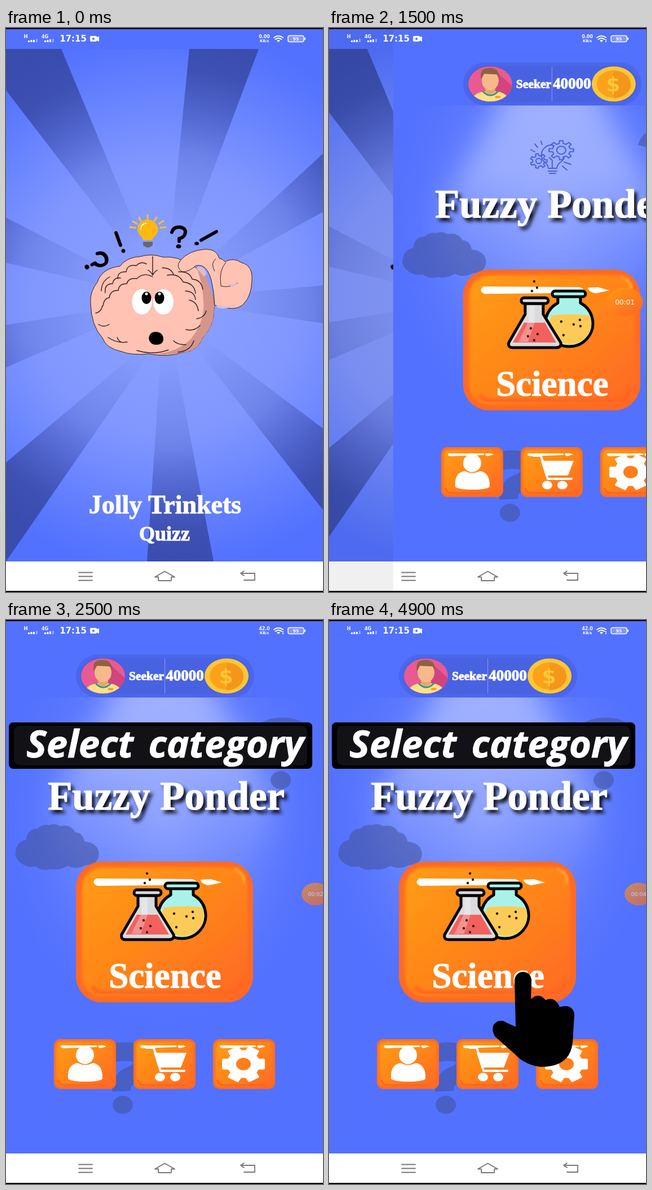
Animation, 562 px wide and 997 px high, one loop 5 s. Source, as an HTML page:

```html
<!DOCTYPE html>
<html lang="en">
<head>
<meta charset="utf-8">
<style>
html, body { margin: 0; width: 100%; height: 100%; overflow: hidden; background: #000; }
svg { display: block; width: 562px; height: 997px; }
text { fill: #fff; text-anchor: middle; }
.serif { font-family: "Liberation Serif", serif; font-weight: 700; stroke: #fff; stroke-width: 1; stroke-linejoin: round; }
.wide { font-family: "DejaVu Sans", sans-serif; }
.bold { font-weight: 700; }
.line { fill: none; stroke-linecap: round; stroke-linejoin: round; }
.shade { fill: #404e8e; stroke: #404e8e; opacity: .5; }
</style>
</head>
<body>
<svg viewBox="0 0 562 997">
<defs>
  <radialGradient id="glow" gradientUnits="userSpaceOnUse" cx="281" cy="480" r="480">
    <stop offset="0" stop-color="#8da2ff"/><stop offset=".5" stop-color="#8197ff"/>
    <stop offset=".95" stop-color="#5574ff"/><stop offset="1" stop-color="#5271ff"/>
  </radialGradient>
  <radialGradient id="rayFill" gradientUnits="userSpaceOnUse" cx="281" cy="480" r="480">
    <stop offset=".2" stop-color="#33439a" stop-opacity="0"/><stop offset=".55" stop-color="#33439a" stop-opacity=".22"/>
    <stop offset=".85" stop-color="#33439a" stop-opacity=".75"/><stop offset="1" stop-color="#33439a" stop-opacity=".8"/>
  </radialGradient>
  <radialGradient id="halo">
    <stop offset="0" stop-color="#a5b5ff" stop-opacity=".65"/><stop offset=".5" stop-color="#91a5ff" stop-opacity=".4"/>
    <stop offset="1" stop-color="#5271ff" stop-opacity="0"/>
  </radialGradient>
  <linearGradient id="beam" x2="0" y2="1">
    <stop offset="0" stop-color="#b4c1ff" stop-opacity=".75"/><stop offset=".45" stop-color="#b4c1ff" stop-opacity=".6"/>
    <stop offset="1" stop-color="#91a5ff" stop-opacity="0"/>
  </linearGradient>
  <linearGradient id="orange" x2="1" y2="1">
    <stop offset="0" stop-color="#ff9d12"/><stop offset=".5" stop-color="#ff8519"/><stop offset="1" stop-color="#ff6826"/>
  </linearGradient>
  <linearGradient id="ball" x2="1" y2="1">
    <stop offset="0" stop-color="#ff9a14"/><stop offset="1" stop-color="#ff6523"/>
  </linearGradient>
  <filter id="soft" x="-30%" y="-20%" width="160%" height="140%"><feGaussianBlur stdDeviation="26 14"/></filter>
  <filter id="blend"><feGaussianBlur stdDeviation="2.5"/></filter>
  <filter id="drop" x="-5%" y="-20%" width="110%" height="150%">
    <feDropShadow dx="5" dy="6" stdDeviation="3" flood-color="#000" flood-opacity=".9"/>
  </filter>
  <clipPath id="face"><ellipse cx="172" cy="99" rx="39" ry="31"/></clipPath>
  <clipPath id="below"><path d="M0 137H562V943H0z"/></clipPath>
  <g id="ask">
    <path d="M-12-8q3-10 14-9 13 2 9 13-3 6-10 7v5" stroke="#000" stroke-width="6" class="line"/>
    <ellipse cy="17" rx="4.5" ry="3.5"/>
  </g>
  <g id="bigAsk" class="shade">
    <path d="M450 211Q456 189 491 189 525 189 522 210 520 226 498 233 484 239 485 259" fill="none" stroke-width="33"/>
    <ellipse cx="487" cy="283" rx="18" ry="16" stroke="none"/>
  </g>
  <g id="tile">
    <rect width="110" height="88" rx="11" fill="#ff6a24"/>
    <rect x="4" y="4" width="102" height="79" rx="9" fill="url(#orange)" filter="url(#blend)"/>
    <path d="M8 73q2 8 10 8h74" stroke="#ff6420" stroke-width="3" class="line"/>
    <path d="M13 11h62q4 3-2 3l-56 2q-7-1-4-5zM79 11h9l5 2-11 3q-5-2-3-5z" fill="#fff"/>
  </g>
</defs>

<g id="splash">
  <path d="M0 0H640V943H0z" fill="url(#glow)"/>
  <g id="rays" fill="url(#rayFill)"></g>
  <path d="M0 0H640V37H0z" fill="#5271ff"/>
  <path d="M0 943H640V997H0z" fill="#fff"/>
  <g stroke="#33201e" fill="#ffc2b3">
    <path d="M150 487q-2-20 12-38 8-24 40-28 12-16 36-17 20-6 40 1 30-2 46 14 25 5 32 32 14 22 13 44 0 32-20 52-10 25-34 26-28 10-62 3-30 3-48-4-28-6-34-24-20-22-21-61z"/>
    <path d="M336 419q19 9 22 32 12 22 11 44 0 32-20 52-10 25-34 26-28 7-54 3 45-2 68-28 24-30 21-66-2-35-14-63z" fill="#d5958b" stroke="none"/>
    <path d="M370 490q-1-24-6-44-8-30-27-26-14 12-25 11-12-9-3-20 15-18 45-20 20 0 24 16 8 2 10 6 16-8 30 2 20 5 18 32-1 26-14 40-14 16-52 3z"/>
    <path d="M381 456q-4-28 9-42M381 456q14 4 30-5M372 408q-10 8-2 22" fill="none"/>
    <path d="M338 424q9-8 18 10l-5 6zM372 488q20 8 38 0-18 12-36 6zM392 452q15 4 19-8l-2 10q-8 7-17-2z" fill="#d9bdd0" stroke="none"/>
    <path class="line" stroke-width="1.4" d="M260 404v32m-8-8q6 4 8 9 3-6 8-9M198 443q0-13 15-12 2-14 18-11 8-8 18-3M176 468q-2-16 13-16 2-12 14-10M172 491q2-14 11-14 2-14 16-13 1-12 15-12 3-11 18-9 12-12 28-3M159 504q10-2 12-13M164 524q9 6 19 0M181 547q16 11 34 8m-18-8q3 8 10 9M232 570q28 9 56-1M305 573q22-2 28-20M319 560q-15 0-22-7M277 424q16 0 20 12M286 437q20-4 28 12 20 2 22 20M306 431q20-1 24 13 16 1 19 18M318 465q16 0 18 15M325 481q14 3 16 19M338 514q14-2 17-14M319 533q14 4 25-7M169 465q0-17 15-25"/>
  </g>
  <g fill="#fff">
    <ellipse cx="241" cy="484" rx="17.5" ry="22.5"/><ellipse cx="279" cy="484" rx="18" ry="22.5"/>
    <g fill="#000"><ellipse cx="249" cy="477" rx="8.5" ry="11"/><ellipse cx="272" cy="477" rx="8.5" ry="11"/>
    <path d="M253 549q1-12 13-12 12 1 13 12 0 11-13 11-10 0-13-11z"/></g>
    <circle cx="249" cy="470" r="2.5"/><circle cx="272" cy="470" r="2.5"/>
  </g>
  <path d="M243 375q-1-5-6-9-8-12 0-21 14-13 28 0 9 10 1 21-6 4-6 9z" fill="#ffb80f"/>
  <path d="M239 356q0-9 9-11" stroke="#fff3c4" stroke-width="2" class="line"/>
  <path d="M243 378h17v6q-8 8-17 0z" fill="#6a6670"/>
  <path d="M251 331v8M236 335l3 6M267 335l-4 6M225 342l7 4M279 341l-8 5M220 352l9 1M283 352l-9 1" stroke="#ffc02d" stroke-width="3" class="line"/>
  <use href="#ask" x="306" y="369"/>
  <use href="#ask" transform="translate(160 413) rotate(60) scale(.95 1.12)"/>
  <path d="M195 362l8 22M373 360l-27 15" stroke="#000" stroke-width="6" class="line"/>
  <circle cx="208" cy="394" r="3.5"/><ellipse cx="338" cy="381" rx="4" ry="3"/>
  <text class="serif" x="282" y="858" font-size="46">Jolly Trinkets</text>
  <text class="serif" x="281" y="906" font-size="36">Quizz</text>
</g>
<rect id="dim" width="562" height="997"/>

<g id="home">
  <path d="M0 0H562V943H0z" fill="#5271ff"/>
  <g clip-path="url(#below)">
    <ellipse cx="281" cy="340" rx="310" ry="400" fill="url(#halo)"/>
    <path d="M205 95H357Q390 190 460 290 490 380 450 440H112Q72 380 102 290 172 190 205 95z" fill="url(#beam)" filter="url(#soft)"/>
  </g>
  <path d="M0 943H562V997H0z" fill="#fff"/>

  <rect x="124" y="61" width="316" height="76" rx="38" fill="#4b66ea"/>
  <rect x="131" y="67" width="302" height="64" rx="32" fill="#4862e2"/>
  <g clip-path="url(#face)">
    <path d="M130 60h90v80h-90z" fill="#e95a92"/><path d="M180 75l40 35v30h-50z" fill="#d24480"/>
    <path d="M138 132q3-18 24-20h20q22 2 25 20z" fill="#ffe08a"/>
    <path d="M163 101h18v12q-9 8-18 0z" fill="#eba273"/>
    <ellipse cx="172" cy="93" rx="15" ry="17" fill="#f5b98a"/>
    <path d="M156 91q-4-20 12-20 20-3 21 20l-5-9-23-1z" fill="#92603d"/>
    <path d="M159 112q13 14 27 0" stroke="#299b83" stroke-width="3" fill="none"/>
    <path d="M181 120h9v4h-9z" fill="#ff9c24"/>
  </g>
  <text class="serif" x="249" y="106" font-size="21.5" stroke-width=".4">Seeker</text>
  <path d="M281.5 68v62" stroke="#8c9cf4"/>
  <text class="serif" x="317" y="107" font-size="27" stroke-width=".4">40000</text>
  <ellipse cx="391" cy="99" rx="39" ry="31" fill="#ffc636"/><ellipse cx="391" cy="99" rx="30" ry="24" fill="#fba21a"/>
  <path d="M391 76a30 24 0 0 1 0 48z" fill="#f3961b"/>
  <text class="wide bold" x="390" y="112" font-size="36" style="fill:#ffc636">$</text>

  <g class="line" stroke="#4960d8" stroke-width="2">
    <path id="cogs"/>
    <ellipse cx="298" cy="216" rx="8" ry="7"/><ellipse cx="258" cy="235" rx="5" ry="4.5"/>
    <path d="M275 248q0-6-6-10-10-10-4-22 8-12 20-8M275 248h15q1-7 7-11 7-6 6-9M275 253h15M277 257h11M282 247v-13l-5-5M244 215l7 4M251 205l5 6M262 200l2 6M303 237l12 4M300 244l8 7"/>
  </g>
  <use href="#bigAsk"/><use href="#bigAsk" x="-280" y="574"/>
  <path class="shade" stroke="none" d="M31 432q-18-9-13-27 4-14 18-16 1-19 20-20 8-8 21-6 10-4 19 2 18-5 27 11 12-1 16 16 22 2 25 18 2 22-23 23-17 9-32 1-14 9-30 6-17 4-26-5-13 3-22-3z"/>
  <text class="serif" x="284" y="335" font-size="71" stroke-width="2" filter="url(#drop)">Fuzzy Ponder</text>

  <rect x="124" y="427" width="314" height="249" rx="46" fill="#ff6a24"/>
  <rect x="135" y="437" width="293" height="229" rx="36" fill="url(#orange)" filter="url(#blend)"/>
  <path d="M155 650q5 9 20 9h220q20-2 24-20" stroke="#ff6320" stroke-width="7" class="line" filter="url(#blend)"/>
  <path d="M405 440q17 5 18 25" stroke="#ffae35" stroke-width="4" class="line" filter="url(#blend)"/>
  <path d="M160 457l170 1q13 4 4 9l-70 2-102 1q-12-6-2-13zM345 459l18-1 20 6-24 5q-14-3-14-10z" fill="#fff"/>
  <g stroke="#000" stroke-width="5" stroke-linejoin="round">
    <path d="M292 474h40v12a42 41 0 1 1-40 0z" fill="#a9f2ea"/>
    <rect x="282" y="465" width="59" height="10" rx="5" fill="#a9f2ea"/>
    <path d="M280 508q34-4 68 0 10 25-9 42-25 18-50 0-18-18-9-42z" fill="#fccb57" stroke="none"/>
    <path d="M234 487h32v19l31 50q2 9-8 9h-77q-9 0-7-9l29-50z" fill="#dadade"/>
    <path d="M232 521h37l20 35h-77z" fill="#f2615d" stroke="none"/>
    <path d="M240 490v28l-18 37h17l12-34v-31z" fill="#fff" opacity=".3" stroke="none"/>
    <rect x="227" y="477" width="48" height="10" rx="5" fill="#dadade"/>
  </g>
  <path d="M250 448h0M255 459h0M246 465h0M244 531h0M256 541h0M239 545h0M250 552h0M298 519h0M320 524h0M331 516h0M332 527h0M302 543h0" stroke="#201418" stroke-width="4.4" class="line"/>
  <text class="serif" x="282" y="650" font-size="63" stroke-width="1">Science</text>

  <use href="#tile" x="85" y="741"/><use href="#tile" x="226" y="741"/><use href="#tile" x="367" y="741"/>
  <g fill="#fff">
    <ellipse cx="140" cy="769" rx="16" ry="16"/>
    <path d="M110 811q-2-25 17-28 13 7 27 0 18 3 17 28-5 5-30 5t-31-5z"/>
    <path d="M249 756h13l12 41h42" stroke="#fff" stroke-width="4" class="line"/>
    <path d="M262 765h58l-10 26h-40z"/>
    <ellipse cx="273" cy="808" rx="9" ry="7.5"/><ellipse cx="300" cy="808" rx="9" ry="7.5"/>
    <path id="cog" stroke="#fff" stroke-width="4" stroke-linejoin="round"/>
    <ellipse cx="421" cy="785" rx="13" ry="11" fill="#ff7d1c"/>
  </g>
</g>

<g id="banner">
  <rect x="5" y="181" width="538" height="82" rx="8"/>
  <rect x="14" y="187" width="520" height="70" rx="10" fill="#121115"/>
  <text x="282" y="242.500" font-size="67" font-family="Open Sans, sans-serif" font-weight="700" font-style="italic" word-spacing="9" stroke="#fff">Select category</text>
</g>
<g id="bubble"><ellipse rx="32" ry="25.5" fill="url(#ball)"/><text id="count" class="wide" y="4.5" font-size="12"></text></g>
<path id="hand" d="M329 637a15 15 0 0 1 30 0l-1 33q14-13 26 2 16-8 25 12 22-6 26 12l-3 50q-4 44-56 44-28-3-46-22l-36-32q-10-20 6-27 10-2 15 3l16 7z"/>

<g class="wide bold">
  <text x="35" y="18" font-size="8">H</text><text x="69" y="18" font-size="8">4G</text>
  <path d="M39 25v-3h3v3zM43.500 25v-4h3v4zM48 25v-4h3v4zM68 25v-3h3v3zM72.500 25v-4h3v4zM77 25v-5h3v5z" fill="#fff"/>
  <path d="M53 25v-6h3v6zM82 25v-6h3v6z" fill="#fff" opacity=".4"/>
  <text x="119" y="24" font-size="15">17:15</text>
  <path d="M151 14h8q2 0 2 2l4-1v9l-4-2q0 2-2 2h-8q-2 0-2-2v-6q0-2 2-2z" fill="#fff"/><circle cx="155" cy="19" r="2" fill="#5271ff"/>
  <text id="speed" x="458" y="18" font-size="8"></text><text x="458" y="25" font-size="6.5">KB/s</text>
  <path d="M475 17q8-6 16 0M477.500 20q5.500-4 11 0" stroke="#fff" stroke-width="2" class="line"/><path d="M480 22q3-2 6 0l-3 3z" fill="#fff"/>
  <path id="traffic" d="M491 20v2M491 23v2" stroke="#fff" stroke-width="2"/>
  <rect x="500" y="13.500" width="28" height="11" rx="3" fill="#8196ff" stroke="#fff" stroke-width="1.500"/><path d="M529 17h2v4h-2z" fill="#fff"/>
  <text x="514" y="22" font-size="7.500">95</text>
</g>
<path class="line" stroke="#77777c" stroke-width="1.800" d="M129 962.500h24M129 969.500h24M129 976.500h24M264 970.500l17.500-10 17.500 10h-6v6.500h-23v-6.500zM422 960l-6 4 6 4M416 964h25v12h-19"/>
<path d="M0 0H562V2H0zM0 995H562V997H0z"/>
</svg>
<script>
const $ = id => document.getElementById(id);
const show = (id, on) => $(id).style.display = on ? '' : 'none';
const clamp = v => Math.max(0, Math.min(1, v));

function gear(cx, cy, rx, ry, teeth, width, root) {
  const points = [];
  for (let i = 0; i < teeth; i++)
    for (const [shift, r] of [[-width - .1, root], [-width, 1], [width, 1], [width + .1, root]]) {
      const a = (i + shift) / teeth * 2 * Math.PI;
      points.push((cx + rx * r * Math.cos(a)).toFixed(1) + ' ' + (cy + ry * r * Math.sin(a)).toFixed(1));
    }
  return 'M' + points.join('L') + 'z';
}
$('cog').setAttribute('d', gear(421, 785, 37, 31, 6, .23, .74));
$('cogs').setAttribute('d', gear(298, 216, 22, 17, 8, .18, .72) + gear(258, 235, 15, 13, 7, .18, .72));

// Each ray: its tip, then the outer edge.
$('rays').innerHTML = ['281 475 0 110 0 37 98 37', '281 480 325 37 448 37', '281 480 562 222 562 325',
  '281 480 562 455 562 522', '285 500 562 708 562 852', '281 480 368 943 250 943',
  '290 525 0 943 0 768', '281 480 0 600 0 525', '281 480 0 415 0 335']
  .map(points => `<polygon points="${points}"/>`).join('');

function draw() {
  const t = Math.floor(performance.now() % 5000 / 100) * 100;

  // The home page slides in over the splash, which drifts left and darkens.
  const left = 562 * (1 - clamp((t - 1275) / 545)) ** 3;
  const covered = 1 - left / 562;
  $('home').setAttribute('transform', `translate(${left})`);
  $('splash').setAttribute('transform', `translate(${-38 * covered})`);
  $('dim').setAttribute('opacity', .35 * covered ** 8);

  // The recorder bubble docks at the right edge.
  const dock = clamp((t - 2000) / 300);
  $('bubble').setAttribute('transform', `translate(${524.5 + 24.5 * dock} 484.5) scale(${1 - .22 * dock})`);
  $('bubble').setAttribute('opacity', 1 - .35 * dock);
  $('count').textContent = '00:0' + Math.max(0, Math.floor((t - 400) / 1000));
  $('speed').textContent = t < 2000 ? '0.00' : '42.0';

  show('bubble', t >= 400);
  show('traffic', t >= 1300);
  show('banner', t >= 2100);
  show('hand', t >= 4000);
  requestAnimationFrame(draw);
}
draw();
</script>
</body>
</html>
```
